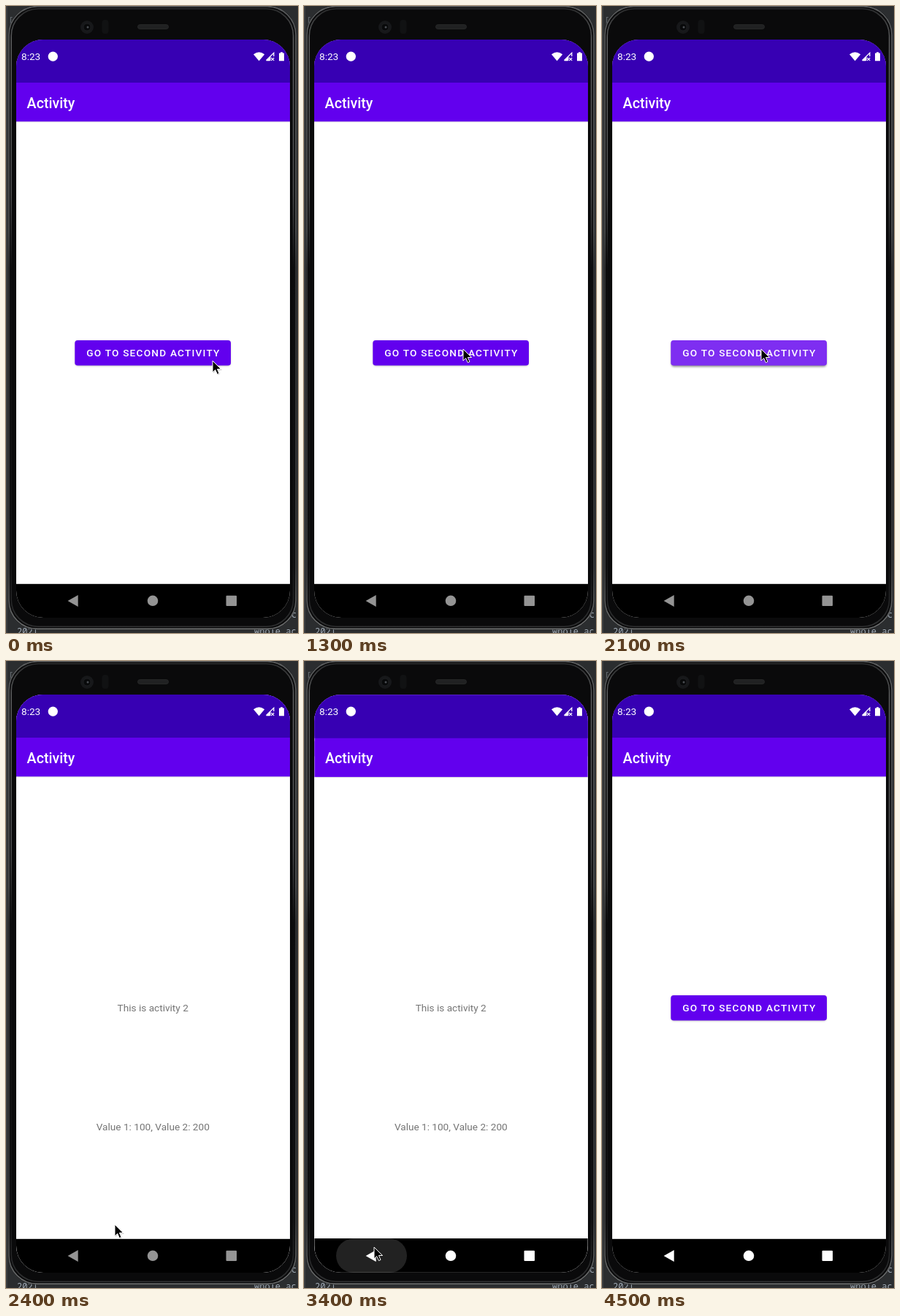
An HTML page that plays this animation: 400 by 859 pixels, repeating every 4.7 s.

```html
<!DOCTYPE html>
<html lang="en">
<head>
<meta charset="utf-8">
<title>Activity navigation</title>
<style>
  html, body { margin: 0; width: 100%; height: 100%; overflow: hidden; background: #2b2d2f; }
  svg { display: block; width: 100vw; height: 100vh; }
  text { font-family: Roboto, sans-serif; font-size: 13.63px; white-space: pre; }
  .title { font-size: 19.6px; font-weight: 500; fill: #fff; }
  .label { font-weight: 500; letter-spacing: .0893em; fill: #fff; }
  .body { fill: #757575; text-anchor: middle; }
  .code { font-family: "Noto Sans Mono", monospace; font-size: 12px; fill: #a3adb8; }
</style>
</head>
<body>
<svg viewBox="0 0 400 859" xmlns="http://www.w3.org/2000/svg">
  <defs>
    <clipPath id="screen"><rect x="14" y="46" width="375" height="792" rx="37"/></clipPath>
    <clipPath id="buttonClip"><rect x="94.3" y="458" width="213.7" height="34.5" rx="3.8"/></clipPath>
    <linearGradient id="rim" x1="0" y1="0" x2="0" y2="1">
      <stop offset="0" stop-color="#5c5e5f"/>
      <stop offset=".36" stop-color="#545657"/>
      <stop offset=".42" stop-color="#333435"/>
      <stop offset=".9" stop-color="#3d3e3f"/>
      <stop offset="1" stop-color="#707272"/>
    </linearGradient>
    <linearGradient id="band" x1="0" y1="0" x2="0" y2="1">
      <stop offset="0" stop-color="#2c2d2e"/>
      <stop offset=".05" stop-color="#5a5b5c"/>
      <stop offset=".3" stop-color="#4a4b4c"/>
      <stop offset=".42" stop-color="#0c0c0d"/>
      <stop offset=".9" stop-color="#141415"/>
      <stop offset="1" stop-color="#303132"/>
    </linearGradient>
    <filter id="blur" x="-20%" y="-60%" width="140%" height="220%"><feGaussianBlur stdDeviation="1.6"/></filter>
    <g id="bars">
      <rect x="14" y="46" width="375" height="792" fill="#fff"/>
      <rect x="14" y="46" width="375" height="112.3" fill="#6200ee"/>
      <rect x="14" y="46" width="375" height="59" fill="#3700b3"/>
      <rect x="14" y="158.3" width="375" height="1" fill="#000" opacity=".12"/>
      <rect x="14" y="791.8" width="375" height="46.2" fill="#000"/>
      <text class="title" x="28.6" y="139.5">Activity</text>
    </g>
  </defs>

  <rect width="400" height="859" fill="#2b2d2f"/>
  <rect width="2" height="859" fill="#3a3c3e"/>
  <text class="code" x="3" y="24" fill-opacity=".5">[</text>
  <text class="code" x="391" y="838">c</text>
  <text class="code" x="15" y="861">2021</text>
  <text class="code" x="340" y="861">whole ac</text>

  <rect x="3" y="-.5" width="395" height="855" rx="40" fill="#0b0b0c"/>
  <rect x="4" y=".6" width="393" height="852.8" rx="39" fill="none" stroke="url(#rim)" stroke-width="1.6"/>
  <rect x="7.2" y="3.8" width="386.4" height="846.4" rx="37" fill="#0a0a0b" stroke="url(#band)" stroke-width="1.6"/>
  <circle cx="111" cy="29" r="9" fill="#17181a"/>
  <circle cx="111" cy="29" r="5" fill="#08090a" stroke="#1d1f21"/>
  <circle cx="112" cy="29" r="1.5" fill="#4a4d52"/>
  <rect x="131.5" y="19" width="9" height="19" rx="4" fill="#111213"/>
  <rect x="180.5" y="25.5" width="42" height="6" rx="3" fill="#202122" stroke="#2b2c2d" stroke-width=".8"/>

  <g clip-path="url(#screen)">
    <rect x="14" y="46" width="375" height="792" fill="#000"/>
    <g id="first">
      <use href="#bars"/>
      <rect id="shadow" x="95" y="459.5" width="212.3" height="34" rx="4" fill="#000" filter="url(#blur)"/>
      <rect x="94.3" y="458" width="213.7" height="34.5" rx="3.8" fill="#6200ee"/>
      <circle id="ripple" cx="219" cy="472" fill="#fff" clip-path="url(#buttonClip)"/>
      <text class="label" x="110.3" y="480">GO TO SECOND ACTIVITY</text>
    </g>
    <g id="second">
      <use href="#bars"/>
      <text class="body" x="201.2" y="480.2">This is activity 2</text>
      <text class="body" x="201.3" y="643.2">Value 1: 100, Value 2: 200</text>
    </g>

    <rect id="pill" y="791.5" height="46.5" rx="23.2" fill="#fff"/>
    <g id="nav">
      <path d="M84.6 815 L98.7 807 V823 Z"/>
      <circle cx="201" cy="814.8" r="7.3"/>
      <rect x="301.5" y="807.7" width="14.5" height="14.3" rx="1"/>
    </g>
    <g fill="#fff">
      <text x="21" y="74.3">8:23</text>
      <circle cx="64.3" cy="69.2" r="6.6"/>
      <path d="M339 66.3 Q346.6 60.2 354.2 66.3 L346.6 75.3 Z"/>
      <path d="M356.5 74.5 L366.8 64.2 V69 M356.5 74.5 H361.5" fill="none" stroke="#fff" stroke-width="1.3"/>
      <path d="M357 74.7 L362.5 69.2 V74.7 Z"/>
      <path d="M363.3 71 L367.2 74.9 M367.2 71 L363.3 74.9" stroke="#fff" stroke-width="1.1"/>
      <path d="M374 64.4 H376 V63.2 H379 V64.4 H381 V75.2 H374 Z"/>
    </g>
  </g>

  <g id="cursor">
    <path d="M1 1 V17 L4 14 L7 19.5 L10 18 L8 13 H13 Z" fill="#000" opacity=".22"/>
    <path d="M0 0 V16 L3.7 12.5 L6.4 18.6 L9 17.4 L6.4 11.5 H11.6 Z" fill="#000" stroke="#fff" stroke-width="1"/>
  </g>
</svg>
<script>
const LOOP = 4700, STEP = 100;
const $ = id => document.getElementById(id);
const clamp = (v, lo = 0, hi = 1) => Math.min(hi, Math.max(lo, v));
const ramp = (t, from, to) => clamp((t - from) / (to - from));
const mix = (a, b, k) => a + (b - a) * k;
const set = (id, attrs) => {
  for (const key in attrs) $(id).setAttribute(key, attrs[key]);
};

// Pointer path: time, x, y
const path = [
  [0, 283, 486], [500, 227, 488], [600, 227, 488], [800, 221, 477],
  [1000, 219, 470], [1200, 219, 470], [1300, 218, 470], [2100, 218, 470],
  [2200, 200, 560], [2300, 165, 710], [2400, 149, 772], [2700, 149, 772],
  [2800, 96, 803], [3400, 96, 803], [3500, 110, 735], [3600, 130, 625],
  [3700, 174, 353], [3800, 164, 240], [3900, 138, 145], [4000, 108, 70],
  [4100, 68, 8], [4200, 60, -30], [4700, 60, -30]
];
function pointer(t) {
  const i = path.findIndex(p => p[0] > t);
  const [t0, x0, y0] = path[i - 1], [t1, x1, y1] = path[i];
  const k = ramp(t, t0, t1);
  return [mix(x0, x1, k), mix(y0, y1, k)];
}

const cubic = (a, b, c, d, u) => {
  const v = 1 - u;
  return a * v * v * v + 3 * b * u * v * v + 3 * c * u * u * v + d * u * u * u;
};
// Two-part curve: quick start, very slow finish
function ease(x) {
  if (x <= 0 || x >= 1) return clamp(x);
  const [xs, ys] = x < 1 / 6
    ? [[0, .05, .13333, 1 / 6], [0, 0, .06, .4]]
    : [[1 / 6, .20833, .25, 1], [.4, .82, 1, 1]];
  let lo = 0, hi = 1;
  for (let i = 0; i < 24; i++) {
    const mid = (lo + hi) / 2;
    if (cubic(...xs, mid) < x) lo = mid; else hi = mid;
  }
  return cubic(...ys, lo);
}

const OPEN = 2100, CLOSE = 3380, SLIDE = 400;
const scaled = s => `translate(201.5 442) scale(${s}) translate(-201.5 -442)`;

function draw(t) {
  const opening = ease(ramp(t, OPEN, OPEN + 300));
  const closing = ease(ramp(t, CLOSE, CLOSE + SLIDE));
  const back = t >= CLOSE;
  const shown = ramp(t, OPEN + 30, OPEN + 90) * (1 - ramp(t, CLOSE + 35, CLOSE + 110));

  set('first', { transform: scaled(back ? mix(1.1, 1, closing) : mix(1, 1.05, opening)) });
  set('second', {
    transform: scaled(back ? mix(1, .9, closing) : mix(.85, 1, opening)),
    opacity: shown
  });

  const press = ramp(t, 1750, 1950) * (1 - ramp(t, 2050, 2250));
  set('ripple', { r: mix(20, 140, ramp(t, 1750, 1950)), opacity: .24 * press });
  set('shadow', { opacity: mix(.3, .5, press), transform: `translate(0 ${mix(-.6, 1.2, press)})` });

  const grow = 1 - (1 - ramp(t, 3150, 3400)) ** 2;
  const width = mix(46, 97, grow);
  set('pill', {
    x: 92.5 - width / 2, width,
    opacity: .135 * ramp(t, 3150, 3300) * (1 - ramp(t, 3400, 3600))
  });
  const grey = Math.round(mix(148, 255, ramp(t, 3150, 3300)));
  set('nav', { fill: `rgb(${grey},${grey},${grey})` });

  set('cursor', { transform: `translate(${pointer(t)})` });
}

function frame(now) {
  draw(Math.floor((now % LOOP) / STEP) * STEP);
  requestAnimationFrame(frame);
}
draw(0);
requestAnimationFrame(frame);
</script>
</body>
</html>
```
